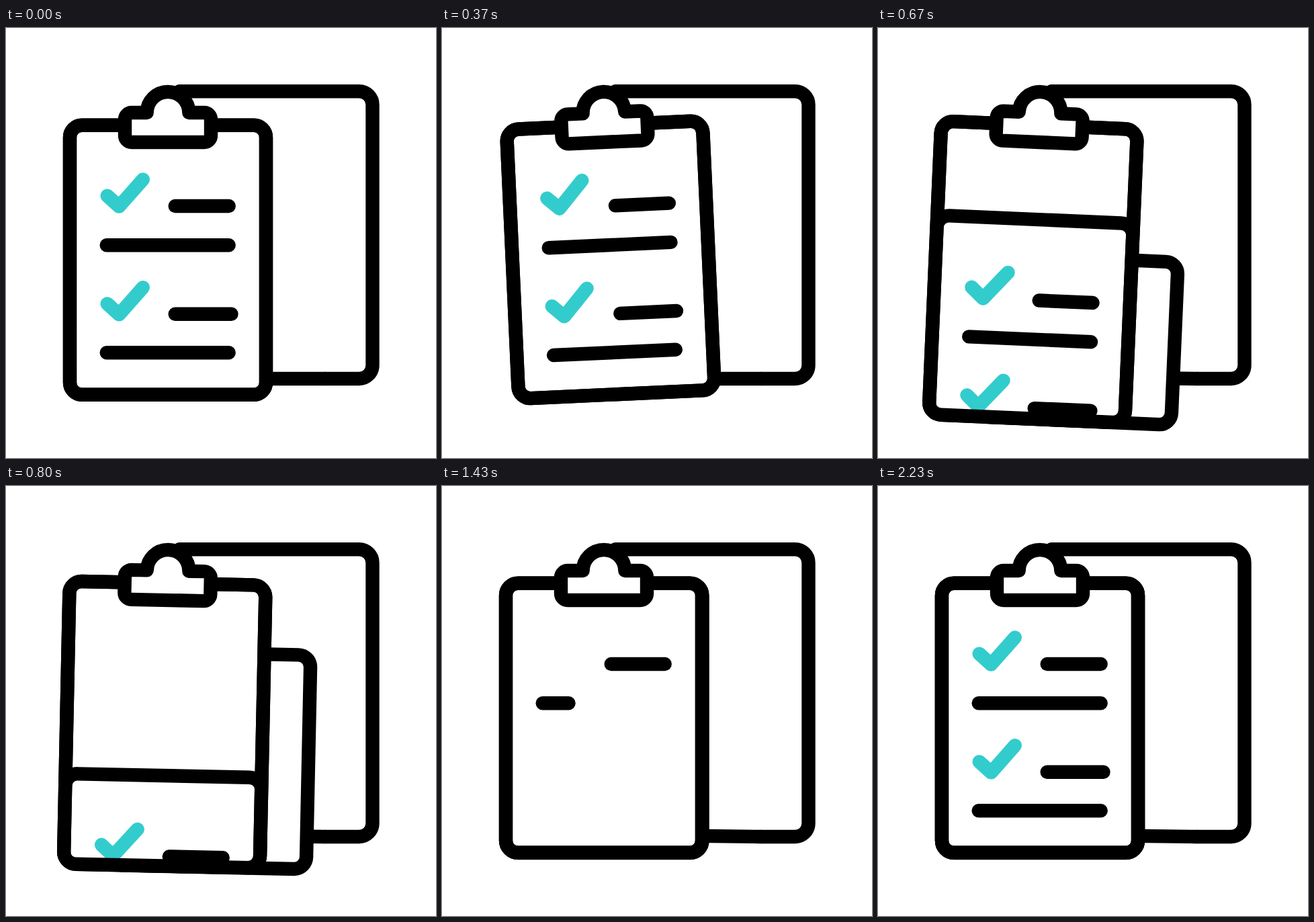
These frames come from a looping animation (640 by 640 pixels, 2500 ms). An HTML page without scripts:

```html
<!DOCTYPE html>
<html lang="en">
<head>
<meta charset="utf-8">
<title>Checklist</title>
<style>
  @property --sway { syntax: "<angle>"; inherits: true; initial-value: 0deg; }
  @property --drop { syntax: "<length>"; inherits: true; initial-value: 0px; }
  @property --slide { syntax: "<length>"; inherits: true; initial-value: 0px; }
  @property --top { syntax: "<length>"; inherits: true; initial-value: 546px; }
  @property --shift { syntax: "<length>"; inherits: true; initial-value: -69px; }
  @property --tilt { syntax: "<angle>"; inherits: true; initial-value: 0deg; }
  @property --ink { syntax: "<number>"; inherits: true; initial-value: 6; }

  html, body { margin: 0; width: 100%; height: 100%; overflow: hidden; background: #fff; }

  svg {
    display: block; width: 100%; height: 100%;
    fill: none; stroke: #000; stroke-width: 20.4;
    stroke-linecap: round; stroke-linejoin: round;
    animation: sway 2.5s cubic-bezier(.33, 0, .67, 1) infinite,
      drop 2.5s linear infinite, slide 2.5s linear infinite,
      rise 2.5s linear infinite, shift 2.5s cubic-bezier(.33, 0, .67, 1) infinite,
      tilt 2.5s linear infinite, ink 2.5s linear infinite;
  }

  .clipboard { transform: rotate(var(--sway)); transform-origin: 240px 128px; }
  .board { height: calc(401px + var(--drop)); }
  .page { transform: translateY(var(--slide)); }
  .sheet {
    y: var(--top);
    height: calc(546px + var(--drop) - var(--top));
    transform: translateX(var(--shift));
  }
  .tail { transform: rotate(var(--tilt)); transform-origin: 475px 522px; }
  .white { fill: #fff; }
  .mark {
    stroke-dasharray: 1 2;
    stroke-dashoffset: calc(clamp(0, 1 + var(--i) - var(--ink), 1) * 1.01px);
  }
  .check { stroke: #3cc; }

  @keyframes sway {
    0%, 36%, 100% { --sway: 0deg; }
    8% { --sway: 4deg; }
    18.68% { --sway: -5.4deg; }
    27.6% { --sway: 2.65deg; }
  }
  @keyframes drop {
    0%, 17.3%, 37%, 100% { --drop: 0px; }
    21.4%, 28% { --drop: 36px; }
  }
  @keyframes slide {
    0% { --slide: 0px; }
    16% { --slide: 0px; animation-timing-function: cubic-bezier(.45, 0, .75, .8); }
    37.4% { --slide: 420px; }
    37.41%, 100% { --slide: 0px; }
  }
  @keyframes rise {
    0%, 15.2% { --top: 546px; }
    37.8%, 100% { --top: 145px; }
  }
  @keyframes shift {
    0%, 15.2%, 58%, 100% { --shift: -69px; }
    18%, 42.8% { --shift: 0px; }
  }
  @keyframes tilt {
    0%, 22% { --tilt: 0deg; }
    26%, 100% { --tilt: .75deg; }
  }
  @keyframes ink {
    0%, 37.4% { --ink: 6; }
    37.41%, 49.1% { --ink: 0; }
    89.1%, 100% { --ink: 6; }
  }
</style>
</head>
<body>
<svg viewBox="0 0 640 640">
  <defs>
    <clipPath id="inside"><rect class="board" x="95" y="144.7" width="292" rx="18"/></clipPath>
  </defs>

  <path d="M258 94.2H525.5a20 20 0 0 1 20 20V502a20 20 0 0 1-20 20H475"/>
  <path class="tail" d="M475 522H300"/>

  <g class="clipboard">
    <rect class="sheet white" x="164" width="292" rx="18"/>
    <rect class="board white" x="95" y="144.7" width="292" rx="18"/>

    <g clip-path="url(#inside)">
      <g class="page">
        <rect class="white" x="95" y="144.7" width="292" height="401" rx="18"/>
        <path class="mark" style="--i:0" pathLength="1" d="M251.7 265H331.7"/>
        <path class="mark" style="--i:1" pathLength="1" d="M149.7 323.3H331.7"/>
        <path class="mark" style="--i:2" pathLength="1" d="M251.7 425.7H335.5"/>
        <path class="mark" style="--i:3" pathLength="1" d="M149.7 483.3H331.7"/>
        <path class="mark check" style="--i:4" pathLength="1" d="M150.7 249.6l17.6 16 35.5-40.2"/>
        <path class="mark check" style="--i:5" pathLength="1" d="M150.7 410.4l17.6 16 35.5-40.2"/>
      </g>
    </g>

    <rect class="board" x="95" y="144.7" width="292" rx="18"/>
    <path class="white" d="M209.7 126H187a10 10 0 0 0-10 10V160a10 10 0 0 0 10 10H295a10 10 0 0 0 10-10V136a10 10 0 0 0-10-10H272.3A31.3 31 0 0 0 209.7 126Z"/>
  </g>
</svg>
</body>
</html>
```
